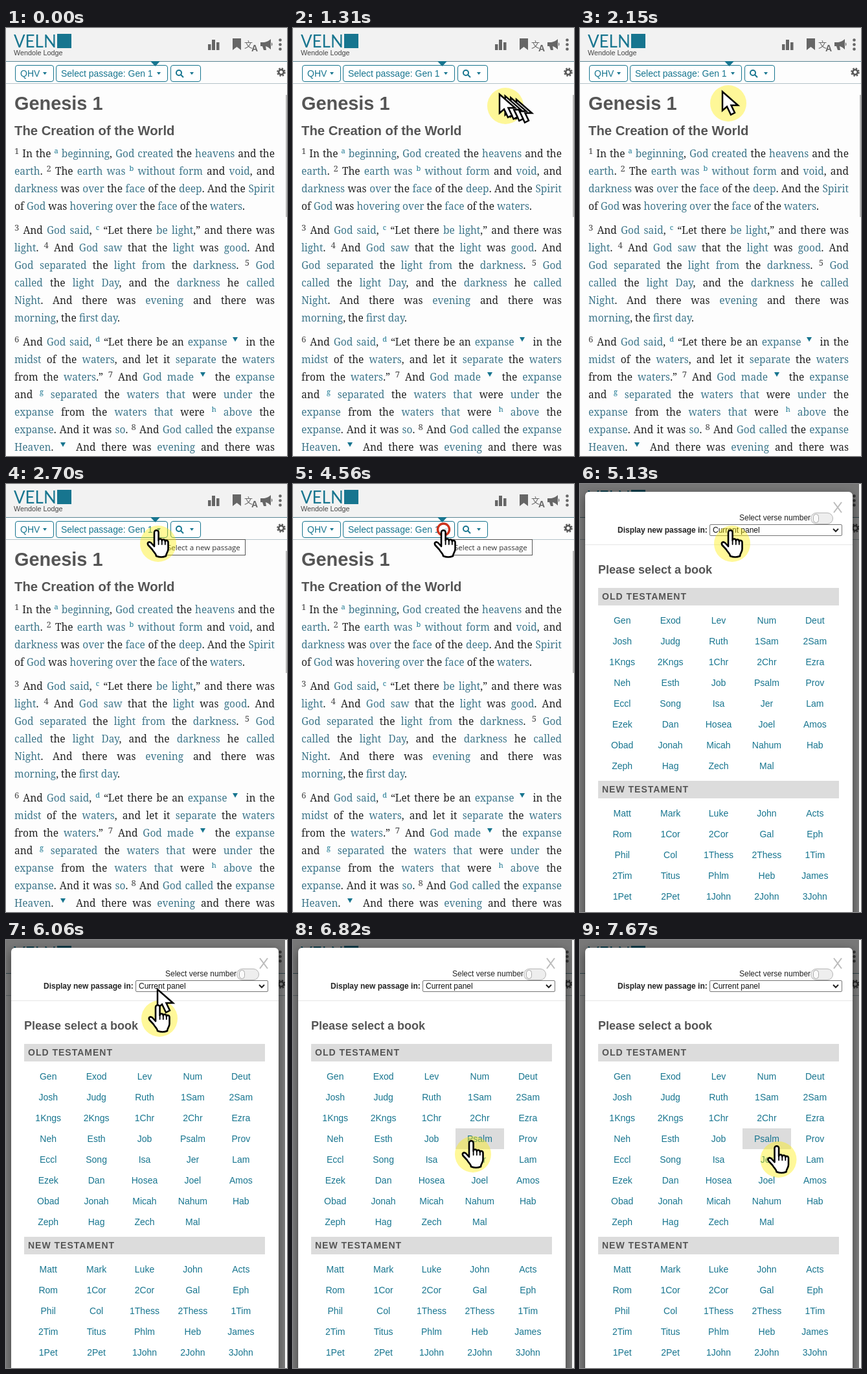
These frames come from a looping animation (434 by 659 pixels, 8 s). An HTML page:

```html
<!DOCTYPE html>
<html lang="en">
<head>
<meta charset="utf-8">
<title>Passage picker</title>
<style>
  html, body { margin: 0; width: 100%; height: 100%; overflow: hidden; background: #fff; }
  #stage { position: relative; width: 434px; height: 659px; overflow: hidden; background: #fdfdfd;
    font: 14px "Liberation Sans", Arial, sans-serif; color: #222; --teal: #17758f; }
  #stage .at, .layer { position: absolute; white-space: nowrap; box-sizing: border-box; }
  .layer { inset: 0; }
  svg { display: block; overflow: visible; }

  .head { left: 0; top: 0; width: 434px; height: 52px; background: #f2f2f2; border-bottom: 1px solid #5c8794; }
  .tools { left: 0; top: 52px; width: 434px; height: 34px; border-bottom: 1px solid #b4c3c8; }
  .brand { left: 12px; top: 4px; font: 26px/32px Lato, sans-serif; color: var(--teal); }
  .square { left: 79px; top: 9px; width: 22px; height: 22px; background: var(--teal); }
  .sub { left: 12px; top: 31px; font-size: 10.8px; line-height: 15px; color: #444; }
  .btn { top: 57px; height: 26px; line-height: 24px; padding-left: 7px; color: var(--teal);
    background: #fff; border: 1px solid var(--teal); border-radius: 4px; }
  .btn::after { content: ""; position: absolute; right: 10px; top: 10px;
    border: 3.5px solid transparent; border-top: 4px solid var(--teal); border-bottom: 0; }
  .focus { outline: 2px solid #111; outline-offset: -1px; }
  h1, h2 { margin: 0; left: 13px; color: #555; }
  h1 { top: 98px; font-size: 28.9px; line-height: 36px; }
  h2 { top: 145px; font-size: 20.3px; line-height: 26px; }

  .verse { position: absolute; left: 13px; width: 402px; font: 15.5px/27px "Noto Serif", Georgia, serif; }
  .verse div { height: 27px; white-space: nowrap; text-align: justify; text-align-last: justify; }
  .verse .end { text-align-last: left; }
  .verse a { color: #3f778b; }
  sup { font-size: 13px; line-height: 0; vertical-align: baseline; position: relative; top: -5px; color: #444; }
  sup.note { font-size: 11px; top: -6px; color: var(--teal); }
  .tri { display: inline-block; vertical-align: 6px; margin: 0 7px 0 2px;
    border: 4px solid transparent; border-top: 7px solid var(--teal); border-bottom: 0; }
  .thumb { left: 432px; top: 103px; width: 2px; height: 188px; background: #bbb; }
  .tip { left: 243px; top: 85px; width: 127px; height: 25px; padding-left: 5px; background: #fff;
    border: 1px solid #555; font: 11.5px/23px "Open Sans", sans-serif; color: #333; }

  #shade { width: 431px; background: rgba(0, 0, 0, .5); }
  #edge { left: 431px; top: 0; width: 3px; height: 659px; background: #fafafa; }
  #modal { width: 431px; overflow: hidden; }
  .sheet { left: 8px; top: 12px; width: 413px; height: 680px; background: #fff;
    border-radius: 6px; box-shadow: 0 5px 15px rgba(0, 0, 0, .5); }
  .small { font-size: 12px; line-height: 16px; }
  .select { left: 200px; top: 62px; width: 205px; height: 18px; padding-left: 4px;
    border: 1px solid #767676; border-radius: 2px; background: #fff; color: #111; }
  .toggle { left: 356px; top: 44px; width: 35px; height: 18px; border: 1px solid #b5b5b5;
    border-radius: 9px; background: #eee; }
  .toggle::after { content: ""; position: absolute; left: 3px; top: 1px; width: 7px; height: 12px;
    border: 1px solid #aaa; border-radius: 5px; background: #fafafa; }
  .bar { left: 28px; width: 372px; height: 27px; padding-left: 6px; background: #dcdcdc;
    font-weight: bold; line-height: 27px; letter-spacing: 1px; color: #555; }
  .books { left: 28px; width: 372px; display: grid; grid-template-columns: repeat(5, 1fr);
    grid-auto-rows: 32px; text-align: center; line-height: 32px; color: var(--teal); }
  .books .on { background: #dcdcdc; }
</style>
</head>
<body>
<div id="stage">
  <div class="at head"></div>
  <div class="at tools"></div>
  <div class="at brand">VELN</div>
  <div class="at square"></div>
  <div class="at sub">Wendole Lodge</div>

  <div class="at btn" style="left:14px;width:60px">QHV</div>
  <div class="at btn" id="pick" style="left:77px;width:173px">Select passage: Gen 1</div>
  <div class="at btn" style="left:254px;width:47px"></div>

  <svg class="layer" width="434" height="659" fill="#666">
    <path d="M223 51h15l-7.5 8z" fill="#17758f"/>
    <g fill="none" stroke="#17758f" stroke-width="2"><circle cx="267" cy="69" r="4"/><path d="M270 72l4 4"/></g>
    <path d="M312 25h4.5v9h-4.5zM318 18h5v16h-5zM325 22h4.5v12h-4.5zM350 16h13v18l-6.5-5-6.5 5z"/>
    <text x="368" y="30" font-size="13" font-family="Noto Sans CJK SC, Noto Sans CJK, sans-serif">文</text>
    <text x="379" y="36" font-size="14" font-weight="bold" font-family="Liberation Sans, sans-serif">A</text>
    <path d="M393 22h6q6-1 10-5v16q-4-4-8-5l1 6h-4l-2-6h-3zM410 22q3 3 0 6z"/>
    <circle cx="423.5" cy="18.5" r="2.3"/><circle cx="423.5" cy="25.5" r="2.3"/><circle cx="423.5" cy="32.5" r="2.3"/>
    <g fill="none" stroke="#555"><circle cx="425" cy="68" r="3.8" stroke-width="2.6"/>
      <circle cx="425" cy="68" r="5.8" stroke-width="2" stroke-dasharray="2.5 2.055"/></g>
  </svg>

  <h1 class="at">Genesis 1</h1>
  <h2 class="at">The Creation of the World</h2>
  <div id="text"></div>
  <div class="at thumb"></div>
  <div class="at tip" id="tip">Select a new passage</div>

  <div class="layer" id="shade"></div>
  <div class="at" id="edge"></div>
  <div class="layer" id="modal">
    <div class="at sheet"></div>
    <svg class="layer" width="434" height="100" fill="none">
      <path d="M392 28l12 16M404 28l-12 16" stroke="#bbb" stroke-width="2"/>
      <path d="M8 93.5h413" stroke="#e5e5e5"/>
    </svg>
    <div class="at small" style="left:246px;top:44px">Select verse number</div>
    <div class="at toggle"></div>
    <b class="at small" style="left:58px;top:63px">Display new passage in:</b>
    <div class="at small select">Current panel</div>
    <svg class="layer" width="434" height="100" fill="none"><path d="M391 69l4 4 4-4" stroke="#222" stroke-width="2"/></svg>
    <b class="at" style="left:28px;top:121px;font-size:18px;line-height:22px;color:#555">Please select a book</b>
    <div class="at bar" style="top:160px">OLD TESTAMENT</div>
    <div class="at books" id="old" style="top:194px"></div>
    <div class="at bar" style="top:457px">NEW TESTAMENT</div>
    <div class="at books" id="new" style="top:491px"></div>
  </div>

  <svg class="layer" width="434" height="659">
    <defs>
      <path id="arrow" d="M1 1V30L8 24L14 36.5L20 33.5L14.5 22H25Z" fill="#fff" stroke="#000" stroke-width="2.5"/>
      <g id="hand" fill="#fff" stroke="#000" stroke-width="2.6" stroke-linejoin="round" stroke-linecap="round">
        <path d="M12 26V4.5a3.3 3.3 0 0 1 6.6 0V17c0-3.5 5.2-3.5 5.2.5c.5-3 5-2.5 5 1c.6-2.5 4.7-2 4.7 1.5V30c0 5-3 6-3.5 11q-7 3-15 0c0-4-4-6-6-10L2.5 24c-2-4 1.5-6 4.5-3.5Z"/>
        <path d="M18.6 17v6M23.8 18v5M28.8 19v4" fill="none" stroke-width="1.8"/>
      </g>
    </defs>
    <circle id="glow" r="28" fill="#ffee00" fill-opacity=".4"/>
    <circle id="ring" cx="232.5" cy="70" fill="#fff" fill-opacity=".8" stroke="#cc331c" stroke-width="3.5"/>
    <g id="trail"><use href="#arrow"/><use href="#arrow"/><use href="#arrow"/></g>
    <use id="arrowCur" href="#arrow"/>
    <use id="handCur" href="#hand"/>
  </svg>
</div>

<script>
const $ = id => document.getElementById(id);

// _linked words_, ^verse, ~footnote, * marker
const verses = [[180, `^1 In the ~a _beginning_, _God created_ the _heavens_ and the
_earth_. ^2 The _earth was_ ~b _without form_ and _void_, and
_darkness_ was _over_ the _face_ of the _deep_. And the _Spirit_
of _God_ was _hovering over_ the _face_ of the _waters_.`],
[298, `^3 And _God said_, ~c “Let there _be light_,” and there was
_light_. ^4 And _God saw_ that the _light_ was _good_. And
_God separated_ the _light from_ the _darkness_. ^5 _God_
_called_ the _light Day_, and the _darkness_ he _called_
_Night_. And there was _evening_ and there was
_morning_, the _first day_.`],
[470, `^6 And _God said_, ~d “Let there be an _expanse_ * in the
_midst_ of the _waters_, and let it _separate_ the _waters_
from the _waters_.” ^7 And _God made_ * the _expanse_
and ~g _separated_ the _waters that_ were _under_ the
_expanse_ from the _waters that_ were ~h _above_ the
_expanse_. And it was _so_. ^8 And _God called_ the _expanse_
_Heaven_. * And there was _evening_ and there was`]];

const markup = s => s.replace(/_(.+?)_/g, '<a>$1</a>')
  .replace(/\^(\d)/g, '<sup>$1</sup>')
  .replace(/~(\w)/g, '<sup class="note">$1</sup>')
  .replace(/\*/g, '<span class="tri"></span>');

$('text').innerHTML = verses.map(([top, text]) => {
  const lines = text.split('\n');
  return `<div class="verse" style="top:${top}px">` + lines.map((line, i) => {
    const end = i === lines.length - 1 && /\.$/.test(line);
    return `<div${end ? ' class="end"' : ''}>${markup(line)}</div>`;
  }).join('') + '</div>';
}).join('');

const fill = (id, names) => {
  $(id).innerHTML = names.split(' ').map(n => `<span>${n}</span>`).join('');
};
fill('old', 'Gen Exod Lev Num Deut Josh Judg Ruth 1Sam 2Sam 1Kngs 2Kngs 1Chr 2Chr Ezra ' +
  'Neh Esth Job Psalm Prov Eccl Song Isa Jer Lam Ezek Dan Hosea Joel Amos ' +
  'Obad Jonah Micah Nahum Hab Zeph Hag Zech Mal');
fill('new', 'Matt Mark Luke John Acts Rom 1Cor 2Cor Gal Eph Phil Col 1Thess 2Thess 1Tim ' +
  '2Tim Titus Phlm Heb James 1Pet 2Pet 1John 2John 3John');
const cells = [...$('old').children];

// pointer centre: time, x, y
const path = [
  [590, 455, 262], [770, 385, 190], [950, 303, 100], [1100, 330, 114], [1250, 354, 128],
  [1310, 328, 120], [1370, 332, 117], [1800, 272, 108], [2150, 229, 116], [2210, 229, 116],
  [2510, 235, 92], [6059, 235, 92], [6060, 237, 121], [6120, 233, 195], [6180, 236, 300],
  [6240, 250, 385], [6300, 268, 352], [6360, 278, 330], [6820, 278, 330],
  [7300, 299, 335], [7600, 306.5, 338]
];
const segments = [590, 6060, 6820];
const BEAT = 60, LOOP = 8000;

function pointer(t) {
  const i = path.findIndex(p => p[0] > t);
  if (i === 0) return path[0].slice(1);
  if (i < 0) return path[path.length - 1].slice(1);
  const [t0, x0, y0] = path[i - 1], [t1, x1, y1] = path[i];
  const k = (t - t0) / (t1 - t0);
  return [x0 + (x1 - x0) * k, y0 + (y1 - y0) * k];
}

// the pointer is redrawn every 60 ms within each stretch of movement
function snap(t) {
  if (t >= 2510 && t < 6060) return 2510;
  const start = segments.filter(s => s <= t).pop() ?? segments[0];
  return start + Math.floor((t - start) / BEAT) * BEAT;
}

const show = (el, on) => { el.style.display = on ? '' : 'none'; };
const place = (el, x, y) => el.setAttribute('transform', `translate(${x.toFixed(2)} ${y.toFixed(2)})`);
const within = (t, a, b) => t >= a && t < b;

function render(t) {
  const [x, y] = pointer(snap(t));
  const seen = t >= 590, hand = t >= 2390;
  const early = within(t, 590, 1370), crossing = within(t, 6060, 6120);

  show($('glow'), seen && !within(t, 4560, 4680));
  place($('glow'), x, y);
  show($('handCur'), hand);
  place($('handCur'), x - 18, y - 22);
  show($('arrowCur'), seen && !hand || crossing);
  if (crossing) place($('arrowCur'), 233, 75);
  else place($('arrowCur'), x - 10, y - 19);

  show($('trail'), early);
  [...$('trail').children].forEach((ghost, i) => {
    const [gx, gy] = pointer(snap(t) - 20 * (3 - i));
    place(ghost, gx - 10, gy - 19);
  });

  show($('tip'), within(t, 2700, 4620));
  $('pick').classList.toggle('focus', t >= 4620);

  const fade = Math.min(1, Math.max(0, Math.floor((t - 4560) / 62) / 4));
  $('shade').style.opacity = fade;
  show($('edge'), fade > 0);
  show($('ring'), within(t, 4560, 5070));
  $('ring').setAttribute('r', 9 - 3.5 * fade);
  $('ring').style.opacity = 1 - .65 * fade;
  $('modal').style.opacity = t < 5070 ? 0 : t < 5130 ? .5 : 1;

  const col = Math.floor((x - 3 - 28) / 74.4), row = Math.floor((y - 21 - 194) / 32);
  const hot = t >= 6060 && row >= 0 ? row * 5 + col : -1;
  cells.forEach((c, i) => c.classList.toggle('on', i === hot));
}

const begin = performance.now();
function tick() {
  render((performance.now() - begin) % LOOP);
  requestAnimationFrame(tick);
}
tick();
</script>
</body>
</html>
```
